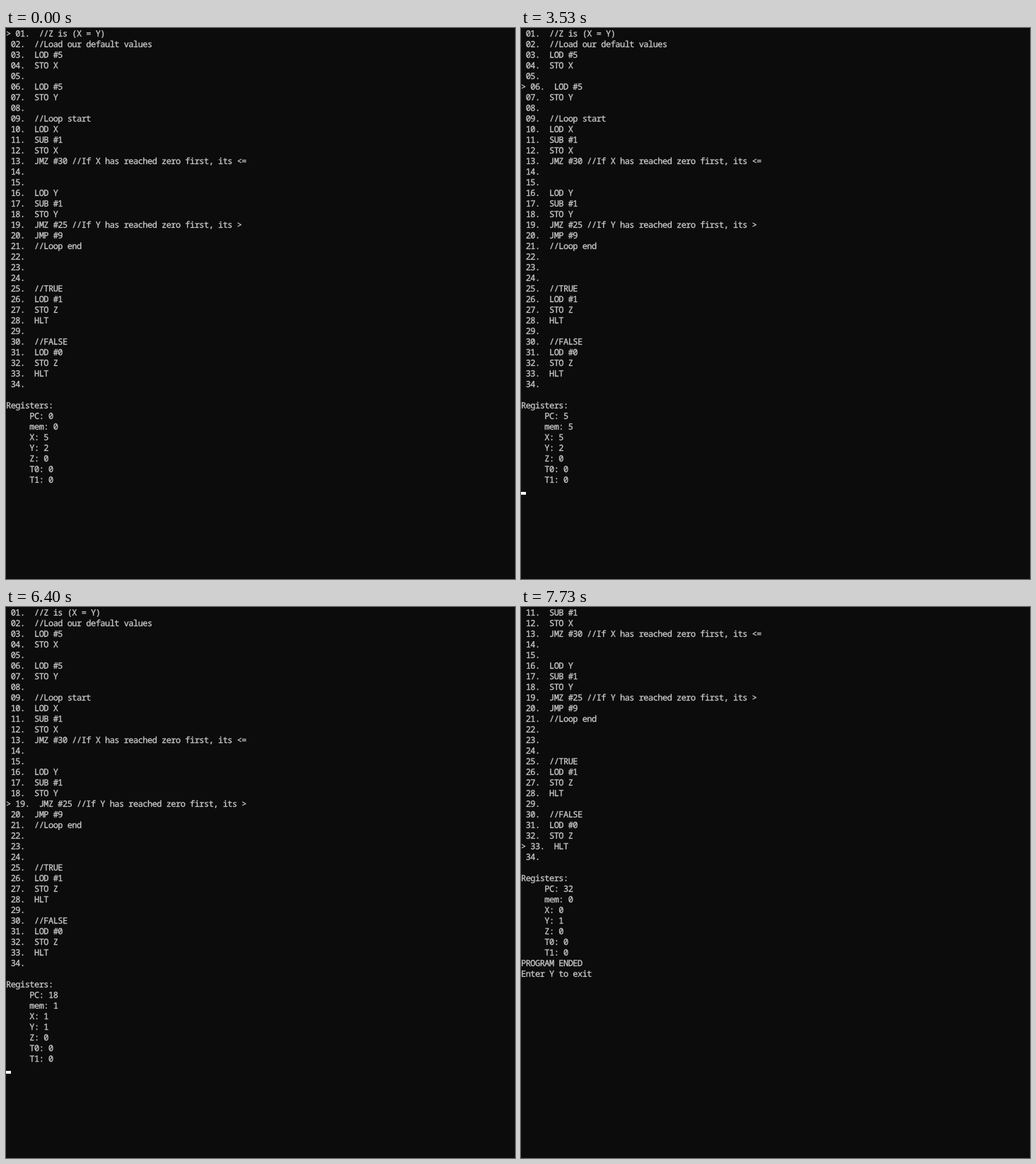
An HTML page that plays this animation: 720 by 778 pixels, repeating every 8000 ms.

```html
<!DOCTYPE html>
<html lang="en">
<head>
<meta charset="utf-8">
<title>Register machine</title>
<style>
  html, body { margin: 0; width: 100%; height: 100%; overflow: hidden; background: #0c0c0c; }
  #screen {
    position: absolute; inset: 0; margin: 0; overflow: hidden;
    font: 12px/15px "Noto Sans Mono", "DejaVu Sans Mono", monospace;
    letter-spacing: -0.533px;
    font-variant-ligatures: none;
    text-rendering: geometricPrecision;
    -webkit-text-stroke: 0.3px #ccc;
    color: #ccc;
  }
  #cursor { position: absolute; left: 0; width: 6.667px; height: 4.2px; background: #fff; }
</style>
</head>
<body>
<pre id="screen"></pre>
<div id="cursor"></div>
<script>
const program = `//Z is (X = Y)
//Load our default values
LOD #5
STO X

LOD #5
STO Y

//Loop start
LOD X
SUB #1
STO X
JMZ #30 //If X has reached zero first, its <=


LOD Y
SUB #1
STO Y
JMZ #25 //If Y has reached zero first, its >
JMP #9
//Loop end



//TRUE
LOD #1
STO Z
HLT

//FALSE
LOD #0
STO Z
HLT
`.split("\n");

const LOOP = 8000, ROW = 15, LAST_ROW = 50;
const TAP = { start: 2451, gap: 248.6, count: 9 };
const HOLD = { start: 4936, gap: 34.9 };
const ENTER = { start: 6768, gap: 35, count: 15 };

const screen = document.getElementById("screen");
const cursor = document.getElementById("cursor");

// Number of key presses a run has produced by time t
const presses = (t, run) =>
  Math.min(run.count ?? Infinity, Math.max(0, Math.floor((t - run.start) / run.gap) + 1));

function step(m) {
  const [, op, hash, arg] = program[m.PC].match(/^([A-Z]{3})(?: (#?)(\w+))?/) || [];
  const value = hash ? +arg : m[arg];
  if (op === "HLT") return { ...m, halted: true };
  const next = { ...m, PC: m.PC + 1 };
  if (op === "LOD") next.mem = value;
  if (op === "SUB") next.mem -= value;
  if (op === "STO") next[arg] = m.mem;
  if (op === "JMP" || (op === "JMZ" && m.mem === 0)) next.PC = value;
  return next;
}

// Every machine state from the first line to the halt
const states = [{ PC: 0, mem: 0, X: 5, Y: 2, Z: 0, T0: 0, T1: 0 }];
while (!states.at(-1).halted) states.push(step(states.at(-1)));

function listing(m) {
  const lines = program.map((code, i) =>
    `${i === m.PC ? "> " : " "}${String(i + 1).padStart(2, "0")}.  ${code}`);
  lines.push("", "Registers:");
  for (const name of ["PC", "mem", "X", "Y", "Z", "T0", "T1"]) lines.push(`     ${name}: ${m[name]}`);
  if (m.halted) lines.push("PROGRAM ENDED", "Enter Y to exit");
  return lines;
}

function cursorOn(t) {
  return (t >= 1330 && t < 1860) || (t >= TAP.start && t < 7730);
}

let shown = -1;
function draw(now) {
  // The screen refreshes 15 times a second
  const tick = Math.floor((now % LOOP + 3.4) * 0.015);
  if (tick !== shown) {
    shown = tick;
    const t = tick / 0.015;
    const n = Math.min(states.length - 1, presses(t, TAP) + presses(t, HOLD));
    const m = states[n];
    const lines = listing(m);
    const row = lines.length + (m.halted ? presses(t, ENTER) : 0);
    const scroll = Math.max(0, row - LAST_ROW);
    screen.textContent = lines.slice(scroll).join("\n");
    cursor.style.top = (row - scroll) * ROW + 10 + "px";
    cursor.style.visibility = cursorOn(t) ? "visible" : "hidden";
  }
  requestAnimationFrame(draw);
}
draw(performance.now());
</script>
</body>
</html>
```
